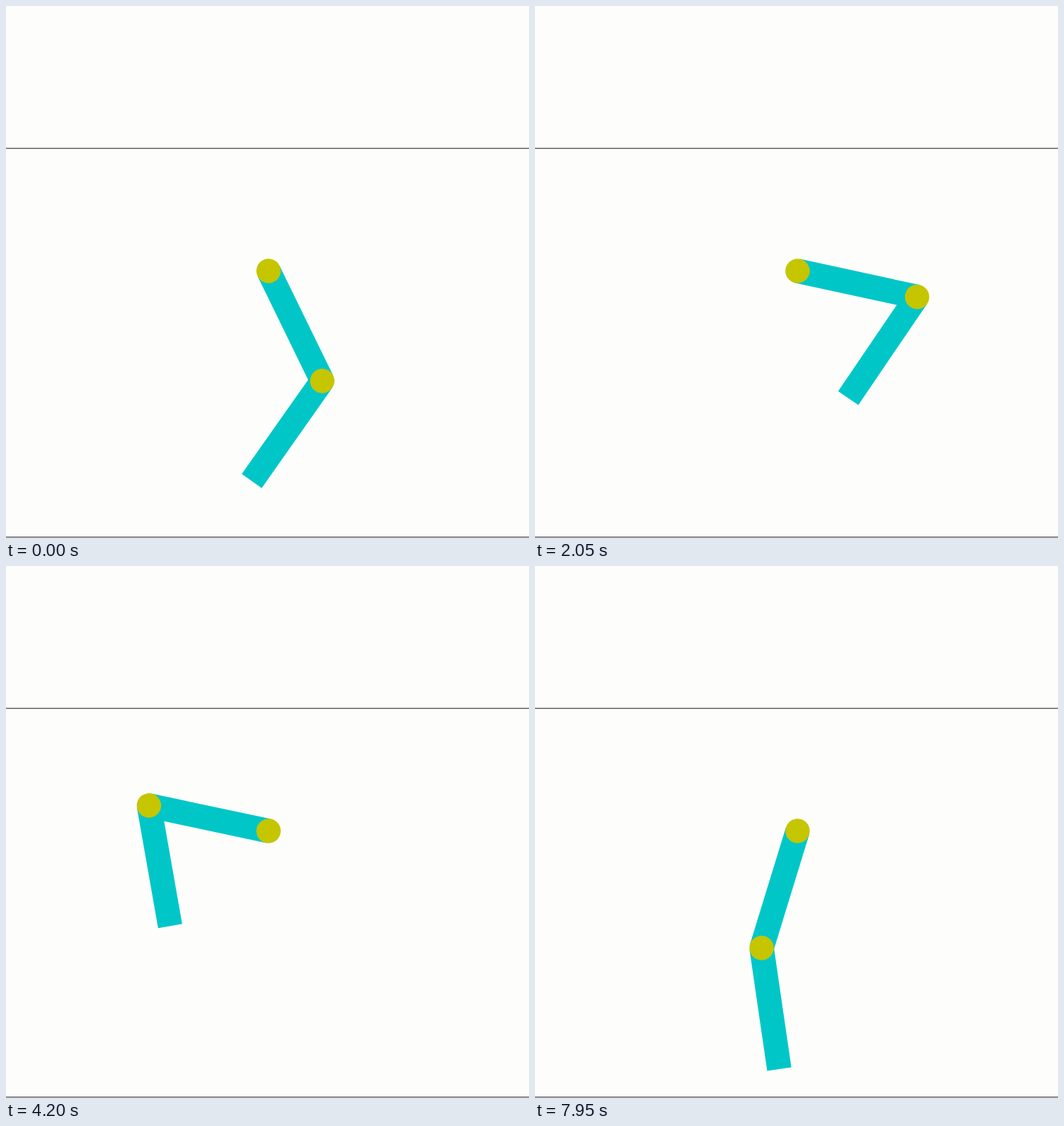
An HTML page that plays this animation: 742 px wide and 754 px high, repeating every 8000 ms.

```html
<!DOCTYPE html>
<html lang="en">
<head>
<meta charset="utf-8">
<title>Two-link pendulum</title>
<style>
  html, body { margin: 0; width: 100%; height: 100%; overflow: hidden; background: #fdfdfc; }
  svg { display: block; width: 742px; height: 754px; }
  .rule { fill: #15151c; }
  .link { fill: #00c6c8; }
  .pin { fill: #c5c500; }
</style>
</head>
<body>
<svg viewBox="0 0 742 754">
  <rect class="rule" y="201.3" width="742" height="1"/>
  <rect class="rule" y="752.3" width="742" height="1"/>
  <g id="upper">
    <rect class="link" x="-17.3" width="34.6" height="173.5"/>
    <circle class="pin" r="17.3"/>
    <g id="lower">
      <rect class="link" x="-17.3" width="34.6" height="173.5"/>
      <circle class="pin" r="17.3"/>
    </g>
  </g>
</svg>
<script>
const LOOP = 8, STEP = 0.05, WHIRL = 2.4, RESET = 6.95, END = 7.95;

// Turning points of the big swings: [seconds, degrees from straight down]
const upperTurns = [
  [2.4, -80], [2.83, 93.5], [3.58, -84], [3.86, 48], [4.2, -102], [4.69, 99], [5.4, -141.3]
];
const lowerTurns = [
  [2.4, 33], [3.15, -95.7], [3.45, -110], [3.85, 105], [4.3, -2.6], [4.72, 144], [5.2, 42], [5.4, 104.2]
];

const upper = document.getElementById('upper');
const lower = document.getElementById('lower');
const wave = (time, period) => Math.cos(2 * Math.PI * time / period);

// Eases from one turning point to the next and rests at the last
function swing(turns, time) {
  const next = turns.findIndex(turn => turn[0] > time);
  if (next < 0) return turns[turns.length - 1][1];
  const [t0, from] = turns[next - 1];
  const [t1, to] = turns[next];
  const eased = (1 - Math.cos(Math.PI * (time - t0) / (t1 - t0))) / 2;
  return from + (to - from) * eased;
}

// The links swing against each other while the amplitude builds up
function pump(time) {
  const amplitude = 85 - 56.1 * Math.exp(-time);
  return [amplitude * wave(time - 0.65, 0.7), -35.2 * wave(time, 0.675)];
}

function restart(time) {
  const growth = (time - 6.65) / (END - 6.65);
  const sway = growth * wave(time - END, 0.54);
  return [-17.1 * sway, 8.3 * sway];
}

function pose(time) {
  if (time < WHIRL) return pump(time);
  if (time < RESET) return [swing(upperTurns, time), swing(lowerTurns, time)];
  return restart(time);
}

function draw(seconds) {
  const time = Math.floor((seconds % LOOP) / STEP + 1e-6) * STEP;
  const [first, second] = pose(time);
  upper.setAttribute('transform', `translate(372.5 375.5) rotate(${-first})`);
  lower.setAttribute('transform', `translate(0 173.5) rotate(${first - second})`);
}

const start = performance.now();
function tick() {
  draw((performance.now() - start) / 1000);
  requestAnimationFrame(tick);
}
tick();
</script>
</body>
</html>
```
